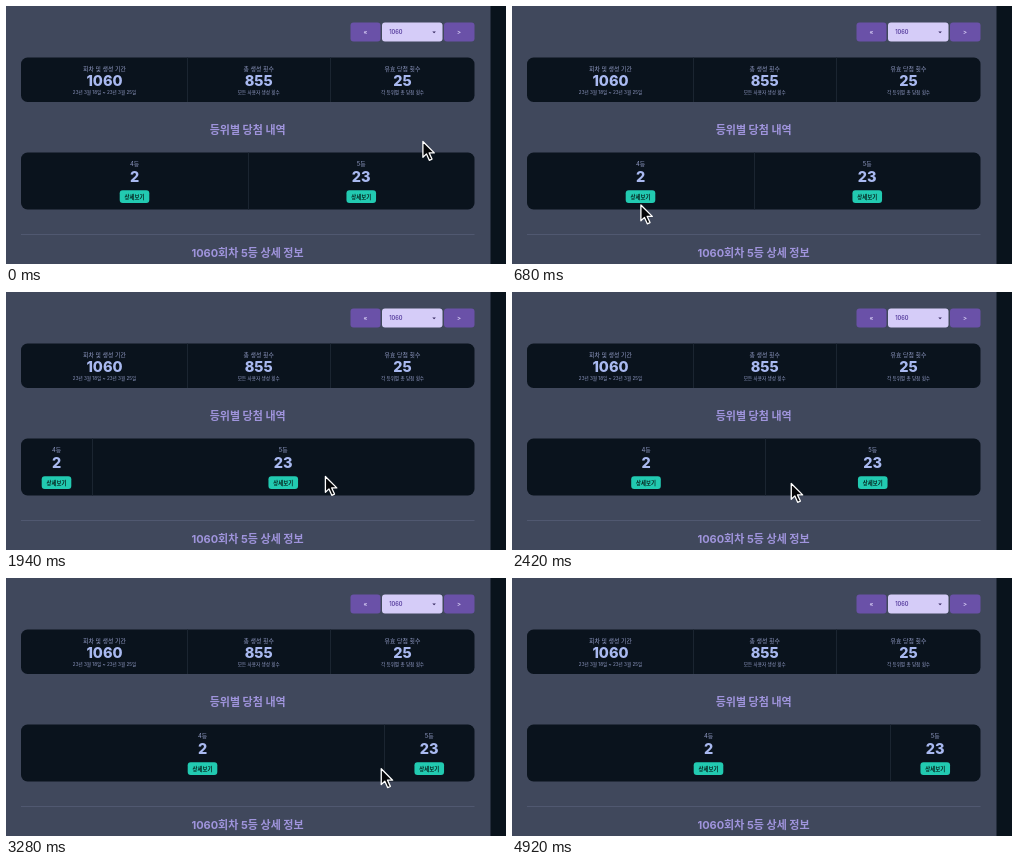
Recreate the animation shown at these times as an HTML page. Size 500 px wide and 258 px high, loop 5260 ms.

```html
<!DOCTYPE html>
<html lang="ko">
<head>
<meta charset="utf-8">
<style>
  html, body { margin: 0; width: 100%; height: 100%; overflow: hidden; background: #40485c; }
  svg { display: block; width: 500px; height: 258px; }
  text { font-family: Inter, "Noto Sans CJK KR", "Noto Sans CJK", sans-serif; text-anchor: middle; }
  .panel { fill: #0a131d; }
  .rule { stroke: #1b2531; stroke-width: 1; }
  .label { font-size: 5.9px; fill: #929cc6; }
  .value { font-size: 14.5px; font-weight: 800; fill: #a9b9f0; }
  .desc { font-size: 4.6px; fill: #929cc6; }
  .title { font-size: 11px; font-weight: 700; fill: #9f94dc; }
  .nav { fill: #6a51a8; }
  .nav-text { font-size: 6px; font-weight: 600; fill: #d9d0f6; }
  .button { fill: #22cab1; }
  .button-text { font-size: 5.4px; font-weight: 600; fill: #06241f; }
</style>
</head>
<body>
<svg viewBox="0 0 500 258">
  <rect width="500" height="258" fill="#40485c"/>
  <rect x="484.5" width="15.5" height="258" fill="#09131c"/>

  <rect class="nav" x="344.5" y="16.5" width="30" height="19" rx="3"/>
  <text class="nav-text" x="359.5" y="28">«</text>
  <rect x="376" y="16.5" width="60.5" height="19" rx="3" fill="#d5ccf8"/>
  <text x="389.8" y="28.2" font-size="5.6" font-weight="600" fill="#5a41a0">1060</text>
  <path d="M426.3 25.4h3.6l-1.8 1.9z" fill="#35285f"/>
  <rect class="nav" x="438" y="16.5" width="30.5" height="19" rx="3"/>
  <text class="nav-text" x="453" y="28">&gt;</text>

  <rect class="panel" x="15" y="51.5" width="453.5" height="44.5" rx="6.5"/>
  <path class="rule" d="M181.5 51.5v44.5M324.5 51.5v44.5"/>
  <g id="summary"></g>

  <text class="title" x="241.7" y="127.6">등위별 당첨 내역</text>

  <rect class="panel" x="15" y="146.5" width="453.5" height="57" rx="6.5"/>
  <path id="divider" class="rule" d="M.5 146.5v57"/>
  <g id="ranks"></g>

  <path d="M15 228.5h453.5" stroke="#505870"/>
  <text class="title" x="241.5" y="250.8">1060회차 5등 상세 정보</text>

  <g id="cursor" stroke-linejoin="round">
    <path id="arrow" d="M.4.5V16.3L4 12.9l2.8 6.4 2.7-1.2-2.8-6.2h5.1z" fill="#050608" stroke="#fff" stroke-width="1.3"/>
    <path id="hand" d="M-1.3 1.2Q0-1 1.4 1.2V6.2Q3-.0 3.9 6.6 5.6 5 6.3 7.3 8.4 6.4 8.6 9.2V12.4Q8.2 14.5 7 15.8V18H-.8V16.2Q-2.6 14-4 10.9-4.3 9-2.9 9.1L-1.3 11z" fill="#fff" stroke="#08090b" stroke-width="1"/>
  </g>
</svg>
<script>
const LOOP = 5260, LEFT = 15, RIGHT = 468.5;
const get = id => document.getElementById(id);

const text = (kind, x, y, value) => `<text class="${kind}" x="${x}" y="${y}">${value}</text>`;

get("summary").innerHTML = [
  [98.5, "회차 및 생성 기간", "1060", "23년 3월 18일 ~ 23년 3월 25일"],
  [252.7, "총 생성 횟수", "855", "모든 사용자 생성 횟수"],
  [396.5, "유효 당첨 횟수", "25", "각 등위별 총 당첨 횟수"]
].map(([x, label, value, desc]) =>
  text("label", x, 64.7, label) + text("value", x, 80.4, value) + text("desc", x, 87.7, desc)
).join("");

get("ranks").innerHTML = [["4등", "2"], ["5등", "23"]].map(([label, value]) => `<g>
  ${text("label", 0, 159.7, label)}${text("value", 0, 175.5, value)}
  <rect class="button" x="-14.8" y="184.3" width="29.6" height="12.8" rx="3"/>
  ${text("button-text", 0, 192.7, "상세보기")}</g>`).join("");
const ranks = [...get("ranks").children];

// [time, divider x]: the columns snap to each new width
const splits = [[0, 242], [1000, 153], [1720, 86], [2280, 253], [2980, 378]];

// [time, x, y] of the pointer tip
const path = [
  [0, 416.5, 135], [80, 416.5, 135], [600, 128.5, 198.5], [780, 128.5, 198.5],
  [900, 127, 191], [1020, 127, 191], [1180, 125, 187], [1240, 125, 187],
  [1720, 319, 184], [1940, 319, 184], [2220, 277, 191], [2460, 279, 191],
  [2840, 292, 189], [3580, 421, 191], [3760, 421, 191], [4080, 506, 200]
];

const ease = u => u * u * (3 - 2 * u);

function pointerAt(t) {
  const i = path.findIndex(key => key[0] > t);
  if (i < 0) return null;
  const [t0, x0, y0] = path[i - 1], [t1, x1, y1] = path[i];
  const u = ease((t - t0) / (t1 - t0));
  return [x0 + (x1 - x0) * u, y0 + (y1 - y0) * u];
}

function draw(t) {
  const split = splits.filter(([start]) => start <= t).pop()[1];
  const centers = [(LEFT + split) / 2, (split + RIGHT) / 2];
  get("divider").setAttribute("transform", `translate(${split})`);
  ranks.forEach((rank, i) => rank.setAttribute("transform", `translate(${centers[i]})`));

  const pointer = pointerAt(t);
  get("cursor").style.display = pointer ? "" : "none";
  if (!pointer) return;
  const [x, y] = pointer;
  const hover = y > 184 && y < 197 && centers.some(c => Math.abs(x - c) < 14.8);
  get("cursor").setAttribute("transform", `translate(${x} ${y})`);
  get("arrow").style.display = hover ? "none" : "";
  get("hand").style.display = hover ? "" : "none";
}

const start = performance.now();
function tick() {
  draw((performance.now() - start) % LOOP);
  requestAnimationFrame(tick);
}
tick();
</script>
</body>
</html>
```
